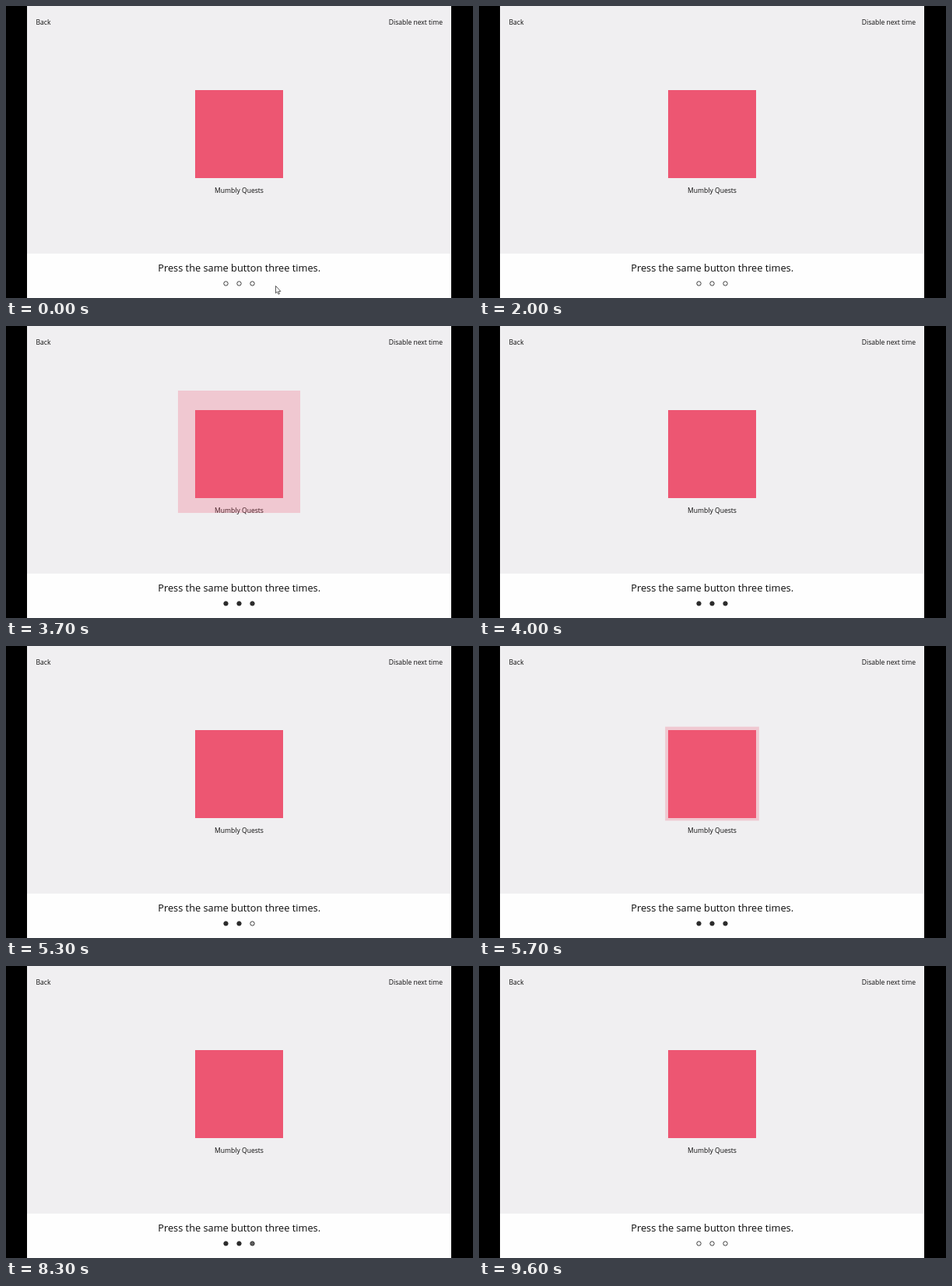
An HTML page that plays this animation: 600x375 px, repeating every 9700 ms.

```html
<!DOCTYPE html>
<html lang="en">
<head>
<meta charset="utf-8">
<title>Picture button sign-in</title>
<style>
  html, body { margin: 0; width: 100%; height: 100%; overflow: hidden; background: #000; }
  svg { display: block; width: 100vw; height: 100vh; }
  text { font: 8.57px "Open Sans", "Noto Sans", sans-serif; fill: #0c0c0c; }
  .mid { text-anchor: middle; }
  .end { text-anchor: end; }
  .prompt { font-size: 12.8px; }
  .tile { fill: #ed5672; }
  .dot { fill: #2b2b2b; stroke: #2b2b2b; stroke-width: .9; }
</style>
</head>
<body>
<svg viewBox="0 0 600 375">
  <rect width="600" height="375"/>
  <rect x="27" width="545" height="375" fill="#fefefe"/>
  <rect x="27" width="545" height="318" fill="#f0eff1"/>
  <text x="38.5" y="24">Back</text>
  <text class="end" x="561" y="24">Disable next time</text>
  <rect class="tile" x="243" y="108" width="113" height="113"/>
  <text class="mid" x="299.5" y="240">Mumbly Quests</text>
  <rect id="flash" class="tile" x="243" y="108" width="113" height="113"/>
  <text class="mid prompt" x="299.7" y="341.3">Press the same button three times.</text>
  <circle class="dot" cx="282.5" cy="356.4" r="2.7"/>
  <circle class="dot" cx="299.5" cy="356.4" r="2.7"/>
  <circle class="dot" cx="316.5" cy="356.4" r="2.7"/>
  <path id="cursor" d="M346.5 359.5v9.3l2.1-1.9 1.4 3.3 1.5-.7-1.4-3.1h2.8z" fill="#fff" stroke="#333" stroke-width=".8"/>
</svg>
<script>
const LOOP = 9700, STEP = 100, FADE = 200;

// Press times of each dot, and when the row clears
const rounds = [
  { on: [2400, 2900, 3400], off: 4100 },
  { on: [4700, 5100, 5400], off: 6000 },
  { on: [6600, 6700, 6800], off: 7100 },
  { on: [7500, 7800, 8150], off: 8800 },
  { on: [9300], off: 9400 }
];
const flashes = [
  { start: 3400, grow: .52 },
  { start: 5400, grow: .09 },
  { start: 8300, grow: .52 }
];
const FLASH_TIME = 400;

const flash = document.getElementById('flash');
const cursor = document.getElementById('cursor');
const dots = document.querySelectorAll('.dot');
const ramp = (t, start, length) => Math.min(1, Math.max(0, (t - start) / length));

function fillOf(t, i) {
  return Math.max(...rounds.map(({ on, off }) =>
    i < on.length ? ramp(t, on[i], FADE) * (1 - ramp(t, off, FADE)) : 0));
}

function draw(t) {
  cursor.style.display = t < 500 ? '' : 'none';
  dots.forEach((dot, i) => dot.setAttribute('fill-opacity', fillOf(t, i)));

  const hit = flashes.find(f => t > f.start && t < f.start + FLASH_TIME);
  flash.style.display = hit ? '' : 'none';
  if (hit) {
    const p = ramp(t, hit.start, FLASH_TIME);
    flash.setAttribute('opacity', 1 - p);
    flash.setAttribute('transform',
      `translate(299.5 172.2) scale(${1 + hit.grow * p}) translate(-299.5 -172.2)`);
  }
}

const begin = performance.now();
function tick() {
  const t = (performance.now() - begin) % LOOP;
  draw(Math.floor(t / STEP) * STEP);
  requestAnimationFrame(tick);
}
tick();
</script>
</body>
</html>
```
